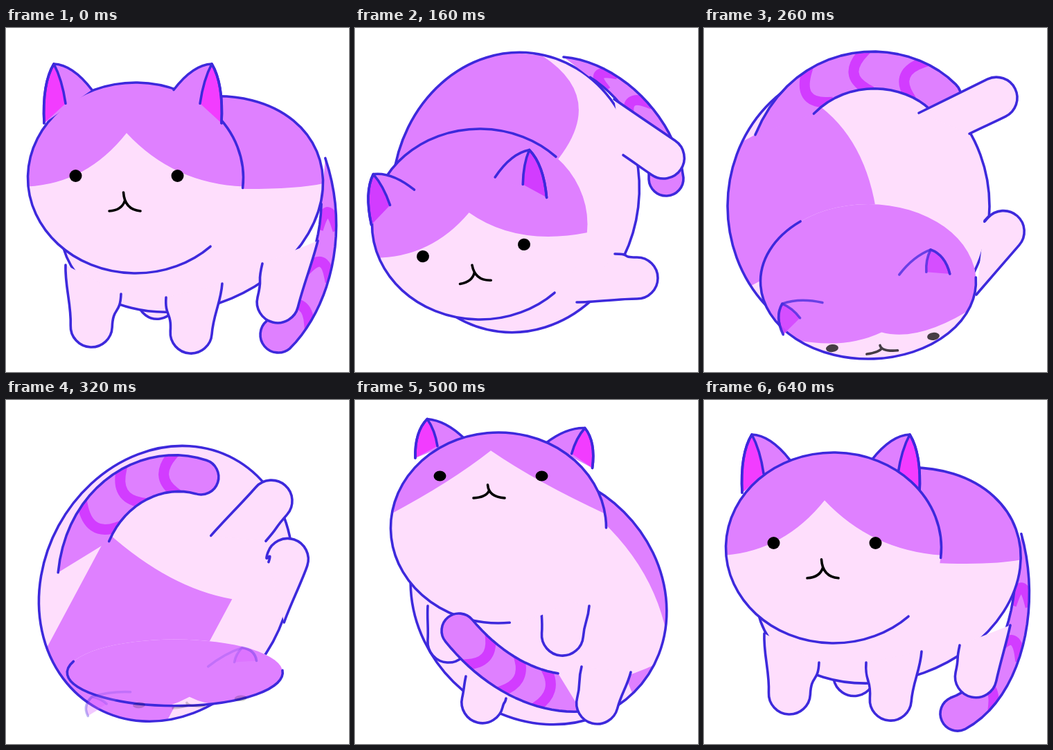
An HTML page with a canvas that plays this animation: 495 px wide and 498 px high, repeating every 0.66 s.

```html
<!DOCTYPE html>
<html lang="en">
<head>
<meta charset="utf-8">
<title>Rolling cat</title>
<style>
html, body { margin: 0; width: 100%; height: 100%; overflow: hidden; background: #fff; }
canvas { display: block; width: 495px; height: 498px; }
</style>
</head>
<body>
<canvas id="stage" width="495" height="498"></canvas>
<script>
const ctx = document.getElementById('stage').getContext('2d');
const LOOP = 660, STEP = 20, TURN = 400;
const INK = '#3d29dc', PINK = '#fedefc', LILAC = '#df80ff', MAGENTA = '#d23cff', HOT = '#f23cff';
const { PI, min, max, abs, cos, sin, hypot, atan2, sqrt } = Math;

// A track eases a few parameters through key poses.
// Times run from one belly-up pose (400) to the next (1060).
const track = keys => ({ times: Object.keys(keys).map(Number), poses: Object.values(keys) });

function slope({ times, poses }, i, n) {
  const d = j => (poses[j + 1][n] - poses[j][n]) / (times[j + 1] - times[j]);
  if (i === 0) return d(0);
  if (i === times.length - 1) return d(i - 1);
  const a = times[i] - times[i - 1], b = times[i + 1] - times[i];
  return (d(i - 1) * b + d(i) * a) / (a + b);
}

function poseAt(tr, T) {
  const { times, poses } = tr;
  let i = 0;
  while (i < times.length - 2 && T >= times[i + 1]) i++;
  const h = times[i + 1] - times[i], u = (T - times[i]) / h, w = 1 - u;
  return poses[i].map((a, n) =>
    a * w * w * (1 + 2 * u) + poses[i + 1][n] * u * u * (1 + 2 * w) +
    h * u * w * (slope(tr, i, n) * w - slope(tr, i + 1, n) * u));
}

const live = (tr, T) => T >= tr.times[0] && T <= tr.times[tr.times.length - 1];

function fill(p, color) { ctx.fillStyle = color; ctx.fill(p); }
function line(p, color = INK, width = 3.6) {
  ctx.strokeStyle = color;
  ctx.lineWidth = width;
  ctx.stroke(p);
}
function clipped(p, draw) {
  ctx.save();
  ctx.clip(p);
  draw();
  ctx.restore();
}
function oval(...args) {
  const p = new Path2D();
  p.ellipse(...args);
  return p;
}

// center, radii, rotation
const body = track({
  400: [248, 274, 211, 148, -.1],
  500: [265, 285, 195, 174, .785],
  640: [266, 254, 196, 150, -.35],
  660: [268, 255, 196, 148, -.4],
  740: [266, 236, 200, 160, -.785],
  820: [232, 238, 203, 178, -1.45],
  920: [223, 258, 203, 189, -1.57],
  1060: [248, 274, 211, 148, -.1]
});

// edge of a coat patch: start, control, end; the patch lies to its left
const rump = [470, 300, 290, 470, 160, 330];
const patches = [
  track({
    430: [420, 120, 480, 230, 475, 345],
    500: [300, 130, 425, 215, 450, 340],
    640: [120, 218, 400, 250, 470, 228],
    660: [120, 222, 410, 245, 475, 220],
    740: [120, 210, 400, 218, 455, 160],
    820: [250, 235, 385, 115, 270, 40],
    920: [250, 275, 235, 160, 160, 108],
    1060: rump
  }),
  track({ 400: rump, 500: [450, 375, 420, 390, 390, 400] })
];

// center, height, face pitch, face shift, face tilt, ear center, ear tilt, outline from/to in degrees
const HEAD_W = 155.5, HEAD_H = 138;
const head = track({
  430: [222, 135, 50, -45, -11, 0, 0, -20, .05, 84, 360],
  500: [207, 185, 138, -75, -11, 0, 11, -151, .057, 84, 360],
  640: [187, 214, 138, -7, -13, 0, -4, -164, 0, 46, 366],
  660: [187, 217, 138, -3, -13, 0, -4, -165, 0, 46, 366],
  740: [182, 231, 138, 16, -13, -.06, -30, -145, -.124, 46, 366],
  820: [180, 284, 138, 38, -9, -.117, -41, -90, -.155, 46, 315],
  920: [237, 367, 112, 88, 21, -.117, -17, -7, -.35, -3, 231],
  1000: [245, 403, 25, 24, 21, -.05, -10, 0, -.3, -3, 190]
});

// a leg is two root points and the tip
const farFore = [
  track({
    400: [152, 167, 222, 148, 182, 99],
    500: [105, 298, 170, 320, 133, 380],
    640: [87, 338, 166, 380, 122, 455],
    660: [86, 343, 166, 385, 122, 462],
    740: [97, 349, 220, 393, 221, 443],
    820: [110, 380, 210, 390, 170, 415]
  }),
  track({ 1000: [150, 185, 220, 170, 183, 140], 1060: [152, 167, 222, 148, 182, 99] })
];
const nearFore = track({
  400: [320, 167, 393, 205, 343, 100],
  500: [269, 283, 338, 298, 297, 370],
  640: [234, 380, 314, 364, 267, 464],
  660: [231, 390, 312, 370, 265, 471],
  740: [277, 398, 340, 349, 372, 443],
  820: [320, 397, 375, 327, 437, 362],
  920: [393, 386, 405, 279, 452, 272],
  1060: [393, 205, 320, 167, 343, 100]
});
const farHind = [
  track({
    400: [70, 334, 140, 320, 103, 229],
    500: [160, 400, 218, 432, 177, 467],
    640: [190, 390, 240, 390, 222, 428],
    660: [196, 395, 240, 392, 222, 421],
    740: [205, 370, 240, 380, 222, 400]
  }),
  track({ 1000: [63, 275, 135, 265, 100, 184], 1060: [70, 334, 140, 320, 103, 229] })
];
const nearHind = track({
  400: [290, 328, 361, 311, 323, 229],
  500: [327, 386, 398, 394, 342, 468],
  640: [369, 355, 442, 326, 386, 430],
  660: [370, 341, 450, 308, 385, 426],
  740: [387, 281, 450, 225, 427, 357],
  820: [387, 184, 374, 103, 470, 205],
  920: [383, 153, 310, 123, 449, 88],
  1060: [361, 311, 290, 328, 323, 229]
});

// Bezier spine, then root and tip radius
const tailUp = [184, 378, 125, 335, 122, 212, 196, 172, 30, 24];
const tail = track({
  400: tailUp,
  500: [325, 424, 265, 428, 200, 395, 150, 334, 27, 25],
  640: [452, 195, 475, 300, 440, 420, 366, 454, 6, 25],
  660: [455, 190, 485, 300, 445, 400, 393, 444, 6, 26],
  740: [432, 140, 475, 200, 482, 300, 440, 335, 10, 26],
  820: [300, 48, 375, 60, 445, 140, 449, 218, 6, 25],
  920: [100, 165, 150, 40, 285, 40, 345, 100, 28, 26],
  1060: tailUp
});

function drawLeg(tr, T) {
  if (!live(tr, T)) return;
  const [ax, ay, cx, cy, tx, ty] = poseAt(tr, T);
  const dx = tx - (ax + cx) / 2, dy = ty - (ay + cy) / 2, len = hypot(dx, dy);
  const ux = dx / len, uy = dy / len, r = min(30, len), k = r * .55;
  const side = Math.sign((ax - tx) * -uy + (ay - ty) * ux) || 1;
  // point at a distance back from the tip and across the leg
  const at = (back, across) => [tx - ux * back - uy * across * side, ty - uy * back + ux * across * side];
  const pull = (len - r) * .45, p = new Path2D();
  p.moveTo(ax, ay);
  p.bezierCurveTo(ax + ux * pull, ay + uy * pull, ...at(r + pull, r), ...at(r, r));
  p.bezierCurveTo(...at(r - k, r), ...at(0, k), tx, ty);
  p.bezierCurveTo(...at(0, -k), ...at(r - k, -r), ...at(r, -r));
  p.bezierCurveTo(...at(r + pull, -r), cx + ux * pull, cy + uy * pull, cx, cy);
  fill(p, PINK);
  line(p);
}

function drawTail(T) {
  const [x0, y0, x1, y1, x2, y2, x3, y3, r0, r1] = poseAt(tail, T);
  const mix = (a, b, c, d, t) => {
    const w = 1 - t;
    return w * w * w * a + 3 * w * w * t * b + 3 * w * t * t * c + t * t * t * d;
  };
  const at = (t, side = 0) => {
    const w = 1 - t;
    const dx = w * w * (x1 - x0) + 2 * w * t * (x2 - x1) + t * t * (x3 - x2);
    const dy = w * w * (y1 - y0) + 2 * w * t * (y2 - y1) + t * t * (y3 - y2);
    const r = side * (r0 + (r1 - r0) * t) / hypot(dx, dy);
    return [mix(x0, x1, x2, x3, t) + dy * r, mix(y0, y1, y2, y3, t) - dx * r];
  };
  const p = new Path2D(), end = atan2(y3 - y2, x3 - x2);
  for (let i = 0; i <= 20; i++) p.lineTo(...at(i / 20, 1));
  p.arc(x3, y3, r1, end - PI / 2, end + PI / 2);
  for (let i = 20; i >= 4; i--) p.lineTo(...at(i / 20, -1));
  fill(p, LILAC);
  clipped(p, () => {
    ctx.lineCap = 'square';
    for (const t of [.3, .55, .82]) {
      const s = new Path2D();
      s.moveTo(...at(t, 1));
      s.quadraticCurveTo(...at(t - .12), ...at(t, -1));
      line(s, MAGENTA, 15);
    }
  });
  line(p);
}

function drawBody(T) {
  const p = oval(...poseAt(body, T), 0, 2 * PI);
  fill(p, PINK);
  clipped(p, () => {
    for (const tr of patches) {
      if (!live(tr, T)) continue;
      const [ax, ay, bx, by, cx, cy] = poseAt(tr, T);
      const far = 600 / hypot(cx - ax, cy - ay), nx = (cy - ay) * far, ny = (ax - cx) * far;
      const s = new Path2D();
      s.moveTo(ax, ay);
      s.quadraticCurveTo(bx, by, cx, cy);
      s.lineTo(cx + nx, cy + ny);
      s.lineTo(ax + nx, ay + ny);
      fill(s, LILAC);
    }
  });
  line(p);
}

function drawEar(x, y, tilt, flip, squash, color) {
  const m = new DOMMatrix().translate(x, y).rotate(tilt * 180 / PI).scale(flip, squash);
  const flap = (cx, cy, ex, ey) => {
    const p = new Path2D(), q = new Path2D();
    q.moveTo(-14, 87);
    q.quadraticCurveTo(-17, 29, 0, 0);
    q.quadraticCurveTo(cx, cy, ex, ey);
    p.addPath(q, m);
    return p;
  };
  const outer = flap(27, 1, 55, 38), inner = flap(12, 23, 17, 58);
  fill(outer, LILAC);
  fill(inner, color);
  line(outer);
  line(inner);
}

function drawFace(c, tilt, x, y) {
  const drop = 36 * c ** 3, h = c * c;
  ctx.save();
  ctx.translate(x, y);
  ctx.rotate(tilt);
  for (const ex of [-73.5, 73.5]) fill(oval(ex, 0, 9, 9 * c, 0, 0, 2 * PI), '#000');
  const mouth = new Path2D();
  mouth.moveTo(-4.5, drop - 12 * h);
  mouth.quadraticCurveTo(-3, drop + 13 * h, 20, drop + 15 * h);
  mouth.moveTo(-2.5, drop);
  mouth.quadraticCurveTo(-7, drop + 14 * h, -25, drop + 15 * h);
  line(mouth, '#000');
  ctx.restore();
}

function drawHead(T) {
  if (T < 440 || !live(head, T)) return;
  const [x, y, ry, pitch, shift, tilt, earX, earY, earTilt, from, to] = poseAt(head, T);
  const c = sqrt(max(.01, 1 - (pitch / ry) ** 2));
  const fx = x + shift, fy = y + pitch;
  const fade = min(1, max(0, (1000 - T) / 110));

  const drawEars = () => {
    ctx.globalAlpha = fade;
    for (const s of [-1, 1])
      drawEar(x + earX + s * 114 * cos(earTilt), y + earY + s * 114 * sin(earTilt), earTilt,
        -s, (1 - abs(pitch) / 220) * ry / HEAD_H, T < 700 ? HOT : MAGENTA);
    ctx.globalAlpha = 1;
  };

  if (T < 650) drawEars();
  const skull = oval(x, y, HEAD_W, ry, 0, 0, 2 * PI);
  fill(skull, PINK);
  clipped(skull, () => {
    const up = 62 * c ** 3, px = fx + up * sin(tilt), py = fy - up * cos(tilt);
    const sag = min(36, max(0, (pitch + 75) / 2));
    const edge = s => [x + s * 160, y + 14 + .42 * pitch + s * 160 * tilt];
    const bend = ([ex, ey]) => [px + .4 * (ex - px), (py + ey) / 2 + sag];
    const l = edge(-1), r = edge(1), mask = new Path2D();
    mask.moveTo(...l);
    mask.quadraticCurveTo(...bend(l), px, py);
    mask.quadraticCurveTo(...bend(r), ...r);
    mask.lineTo(r[0], 0);
    mask.lineTo(l[0], 0);
    fill(mask, LILAC);
  });
  line(oval(x, y, HEAD_W, ry, 0, from * PI / 180, to * PI / 180));
  if (T >= 650) drawEars();
  ctx.globalAlpha = fade;
  drawFace(c, tilt, fx, fy);
  ctx.globalAlpha = 1;
}

function draw(T) {
  ctx.fillStyle = '#fff';
  ctx.fillRect(0, 0, 495, 498);
  ctx.lineCap = ctx.lineJoin = 'round';
  const tailBehind = T > 570 && T < 780, legBehind = T > 560 && T < 800;
  const drawFarHind = () => farHind.forEach(tr => drawLeg(tr, T));
  if (tailBehind) drawTail(T);
  if (legBehind) drawFarHind();
  drawBody(T);
  if (!legBehind) drawFarHind();
  farFore.forEach(tr => drawLeg(tr, T));
  drawLeg(nearFore, T);
  drawHead(T);
  if (!tailBehind) drawTail(T);
  drawLeg(nearHind, T);
}

const start = performance.now();
function tick() {
  const t = Math.floor((performance.now() - start) % LOOP / STEP) * STEP;
  draw(t < TURN ? t + LOOP : t);
  requestAnimationFrame(tick);
}
tick();
</script>
</body>
</html>
```
